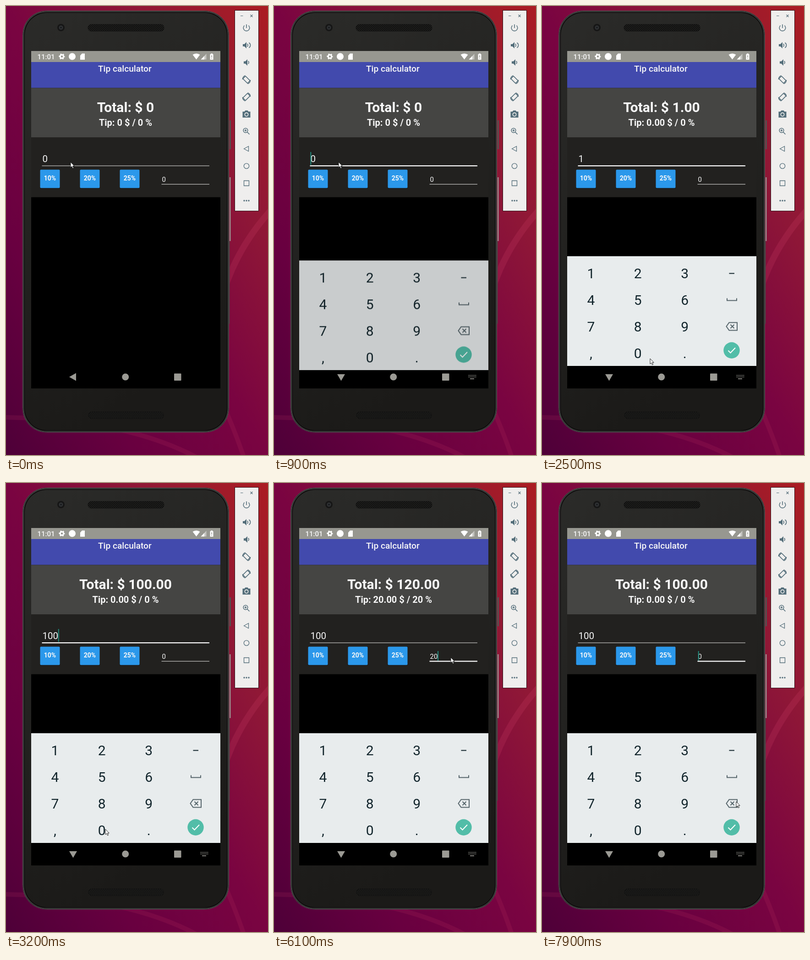
An HTML page for the animation above (8 s loop, 572x978 px).

```html
<!DOCTYPE html>
<html lang="en">
<head>
<meta charset="utf-8">
<title>Tip calculator</title>
<style>
  html, body { margin: 0; width: 100%; height: 100%; overflow: hidden; background: #75033f; }
  svg { display: block; width: 100vw; height: 100vh; }
  text { font-family: Roboto, sans-serif; fill: #f8f8f8; }
  .mid { text-anchor: middle; }
  .bold { font-weight: 700; }
  .key { font-size: 30px; fill: #12252c; text-anchor: middle; }
  .line { fill: none; stroke: #56656b; stroke-width: 2; }
  .tool { fill: none; stroke: #546e7a; stroke-width: 1.6; }
  .tool .solid { fill: #546e7a; stroke: none; }
</style>
</head>
<body>
<svg viewBox="0 0 572 978" preserveAspectRatio="none">
  <defs>
    <linearGradient id="wall" x1="0" y1="1" x2="1" y2="0">
      <stop offset="0" stop-color="#4e0038"/>
      <stop offset=".25" stop-color="#690040"/>
      <stop offset=".5" stop-color="#7a0441"/>
      <stop offset=".75" stop-color="#901836"/>
      <stop offset="1" stop-color="#ab1d22"/>
    </linearGradient>
    <linearGradient id="body" x1="0" y1="0" x2=".3" y2="1">
      <stop offset="0" stop-color="#2b2b29"/>
      <stop offset="1" stop-color="#1b1a18"/>
    </linearGradient>
    <pattern id="mesh" width="4" height="4" patternUnits="userSpaceOnUse">
      <rect width="4" height="4" fill="#252523"/>
      <circle cx="1" cy="1" r="1.1" fill="#050505"/>
      <circle cx="3" cy="3" r="1.1" fill="#050505"/>
    </pattern>
    <clipPath id="screen"><rect x="55" y="98" width="413" height="735"/></clipPath>
  </defs>

  <!-- Wallpaper -->
  <rect width="572" height="978" fill="url(#wall)"/>
  <g fill="none" stroke="#d0406a" stroke-opacity=".2">
    <path d="M470 640Q500 530 580 443" stroke-width="14"/>
    <path d="M0 896Q260 900 420 985M470 860Q498 920 520 985" stroke-width="10" stroke-opacity=".12"/>
  </g>

  <!-- Phone -->
  <path d="M488 249h3v63h-3z" fill="#55504f"/>
  <path d="M488 373h2.500v139h-2.500z" fill="#99908f"/>
  <path d="M487 512h1.500v180h-1.500z" fill="#4a3c40"/>
  <rect x="36.500" y="10.500" width="450" height="918" rx="52" fill="#0b0b0b" stroke="#5b5a59"/>
  <rect x="38.500" y="12.500" width="446" height="914" rx="50" fill="none" stroke="#3e3e3d" stroke-width="2"/>
  <rect x="41" y="15" width="441" height="909" rx="48" fill="url(#body)"/>
  <circle cx="120" cy="47" r="8" fill="#161616"/>
  <circle cx="120" cy="47" r="4.500" fill="#303234"/>
  <circle cx="120" cy="47" r="2" fill="#181a1d"/>
  <g fill="url(#mesh)" stroke="#111" stroke-width=".7">
    <rect x="179" y="40" width="166" height="15" rx="7"/>
    <rect x="180" y="884" width="164" height="15" rx="7"/>
  </g>

  <!-- App -->
  <g clip-path="url(#screen)">
    <rect x="55" y="98" width="413" height="735"/>
    <rect x="55" y="98" width="413" height="24" fill="#979790"/>
    <text x="68.500" y="115.500" font-size="15" font-weight="500">11:01</text>
    <g fill="#fff">
      <circle cx="122" cy="110" r="3.700" fill="none" stroke="#fff" stroke-width="3"/>
      <circle cx="122" cy="110" r="5.600" fill="none" stroke="#fff" stroke-width="2" stroke-dasharray="2.900 2.960" stroke-dashoffset="1.450"/>
      <circle cx="144.500" cy="110" r="7.500"/>
      <path d="M166 103.500h6v13.500h-10v-9z"/>
      <path d="M407.500 106q8-5 16 0l-8 10.500z"/>
      <path d="M437.500 104v12.500h-12z" fill-opacity=".45"/>
      <path d="M433 109v7.500h-7.500z"/>
      <path d="M447 103.500h4v1.500h1.500v12h-7v-12h1.500z"/>
      <path d="M448.200 107.500h1.600v4h-1.600zM448.200 113h1.600v1.600h-1.600z" fill="#979790"/>
    </g>
    <rect x="55" y="122" width="413" height="56.500" fill="#424aad"/>
    <text x="259.300" y="143" class="mid" font-size="19.100" font-weight="500">Tip calculator</text>
    <rect x="55" y="178.500" width="413" height="108" fill="#454543"/>
    <text id="total" x="261" y="230.500" class="mid bold" font-size="30"></text>
    <text id="tip" x="261" y="260.500" class="mid bold" font-size="20"></text>
    <rect x="55" y="286.500" width="413" height="130" fill="#22211f"/>
    <g id="buttons"></g>
    <text id="bill" x="79.500" y="339.500" font-size="20.500"></text>
    <text id="percent" x="340.500" y="382.500" font-size="15"></text>
    <rect id="billLine" x="78.500" width="365.500"/>
    <rect id="percentLine" x="339.500" width="104.500"/>
    <rect id="caret" width="2" fill="#1f8a7d"/>

    <g id="keyboard">
      <rect x="55" y="545" width="413" height="239" fill="#e8eced"/>
      <rect id="pressed" width="102" height="56" rx="3" fill="#cfd5d7"/>
      <g id="keys"></g>
      <path d="M408.500 582.500h11.500" class="line" style="stroke:#12252c"/>
      <path d="M404 636.500v5h21v-5" class="line"/>
      <path d="M408.500 689.500h17.500v17h-17.500l-6-8.500zM411.500 694l8 8m0-8l-8 8" class="line"/>
      <circle cx="414" cy="750" r="17.700" fill="#52bda8"/>
      <path d="M406.500 750.500l5 5l10.500-11" class="line" style="stroke:#fff"/>
    </g>

    <g fill="#9b9a94">
      <path id="back"/>
      <circle cx="260.700" cy="808" r="7.500"/>
      <rect x="367" y="800.500" width="15.500" height="15.500" rx="1"/>
      <g id="switcher" fill="none" stroke="#9b9a94" stroke-width="1.700">
        <path d="M424.500 804.500h17M424.500 808h17" stroke-dasharray="1.800 1.200"/>
        <path d="M428 812h9"/>
      </g>
    </g>
  </g>

  <!-- Emulator toolbar -->
  <rect x="499.500" y="9.500" width="52" height="437" fill="#efeeed" stroke="#2c1116"/>
  <g class="tool">
    <path d="M512 21.500h5.500M533.500 19l5 5m0-5l-5 5" stroke-width="1.100"/>
    <path d="M520.500 42.500a6.800 6.800 0 1 0 9 0M525 40v8"/>
    <g id="speakers"></g>
    <path d="M530.500 80a6.500 6.500 0 0 1 0 11" />
    <g id="rotate">
      <rect x="-4" y="-7" width="8" height="14" rx="1" transform="translate(525 160.500) rotate(-45)"/>
      <path d="M516.500 160a9 9 0 0 1 6-8.500M533.500 161a9 9 0 0 1-6 8.500"/>
    </g>
    <use href="#rotate" transform="translate(1050 37.500) scale(-1 1)"/>
    <path class="solid" d="M516.500 230h4l2-2.500h5l2 2.500h4v13h-17z"/>
    <circle cx="525" cy="236.300" r="3.700" stroke="#efeeed"/>
    <circle cx="523" cy="271" r="4.800"/>
    <path d="M526.500 274.500l5 5M520.500 271h5M523 268.500v5"/>
    <path d="M519.500 311l10-5.500v11zM519.500 380.500h11v11h-11z" stroke-width="1.300"/>
    <circle cx="525" cy="348.500" r="5.700" stroke-width="1.300"/>
    <g class="solid"><circle cx="520" cy="424" r="1.700"/><circle cx="525" cy="424" r="1.700"/><circle cx="530" cy="424" r="1.700"/></g>
  </g>

  <path id="cursor" d="M0 0v11.800l2.700-2.500 1.900 4.400 2-.9-1.900-4.200h3.500z" fill="#fff" stroke="#111" stroke-width=".9"/>
</svg>

<script>
const LOOP = 8000, TICK = 100;
const el = Object.fromEntries([...document.querySelectorAll('[id]')].map(node => [node.id, node]));

// Each entry is [time, value]; values hold until the next entry.
const bills = [[0, ''], [2000, '1'], [2900, '10'], [3100, '100']];
const percents = [[0, ''], [4400, '25'], [5200, '20'], [7400, '2'], [7800, '']];
const focuses = [[0, ''], [800, 'bill'], [6100, 'percent']];
const carets = [[0, 0], [800, 1], [1300, 0], [1800, 1], [2500, 0], [2900, 1], [3600, 0], [4100, 1],
  [4600, 0], [5200, 1], [5800, 0], [6100, 1], [6600, 0], [7100, 1]];
// Column and row of the key held down.
const presses = [[0, null], [1900, [0, 0]], [2100, null], [2900, [1, 3]], [3000, null],
  [3100, [1, 3]], [3200, null], [7300, [3, 2]], [7500, null]];
const ripples = [[4400, 2], [5200, 1]];

const pointer = [[1000, 141, 340], [1500, 113, 585], [2100, 113, 585], [2500, 236, 768], [2600, 236, 768],
  [2700, 217, 754], [3300, 217, 754], [3750, 323, 590], [4200, 268, 380], [4500, 268, 380],
  [4750, 225, 397], [5000, 181, 380], [5200, 181, 380], [5600, 369, 390], [5800, 386, 380],
  [6500, 386, 380], [6700, 383, 528], [7100, 427, 696], [7600, 427, 696], [7800, 424, 694]];
const keyboardSlide = [[800, 40, .45], [900, 9.300, .87], [1000, 0, 1]];

const current = (list, t) => list.filter(([start]) => start <= t).pop()[1];

function tween(frames, t) {
  const next = frames.findIndex(([time]) => time > t);
  if (next < 0) return frames[frames.length - 1].slice(1);
  if (next === 0) return frames[0].slice(1);
  const [from, to] = [frames[next - 1], frames[next]];
  const p = (t - from[0]) / (to[0] - from[0]);
  const eased = p * p * (3 - 2 * p);
  return from.slice(1).map((v, i) => v + (to[i + 1] - v) * eased);
}

function set(node, attributes) {
  for (const [name, value] of Object.entries(attributes)) node.setAttribute(name, value);
}

el.buttons.innerHTML = [10, 20, 25].map((n, i) => {
  const x = 74.5 + 87 * i;
  return `<rect x="${x}" y="358" width="43" height="40" rx="2" fill="#111" opacity=".6"/>
    <rect x="${x}" y="356.500" width="43" height="40" rx="2" fill="#2b98eb"/>
    <circle class="ripple" cx="${x + 20.5}" cy="377" fill="#164f86"/>
    <text x="${x + 21.5}" y="380" class="mid bold" font-size="14">${n}%</text>`;
}).join('');
const rippleCircles = document.querySelectorAll('.ripple');

el.keys.innerHTML = ['123', '456', '789', ',0.'].map((row, r) => [...row].map((label, c) =>
  `<text class="key" x="${107 + 102.3 * c}" y="${592.5 + 58 * r}">${label}</text>`).join('')).join('');

el.speakers.innerHTML = [[522, 85.5], [524, 123]].map(([x, y]) =>
  `<path class="solid" d="M${x - 5} ${y - 2.5}h3.500l4.500-4.500v14l-4.500-4.500h-3.500z"/>
   <path d="M${x + 4.5} ${y - 3}a3.500 3.500 0 0 1 0 6"/>`).join('');

function drawSummary(bill, percent) {
  const money = n => bill ? n.toFixed(2) : '0';
  const tip = bill * percent / 100;
  el.total.textContent = `Total: $ ${money(+bill + tip)}`;
  el.tip.textContent = `Tip: ${money(tip)} $ / ${percent || 0} %`;
  el.bill.textContent = bill || '0';
  el.percent.textContent = percent || '0';
}

function drawFocus(focus, bill, percent, caretOn) {
  const underline = (node, y, active) => set(node, active
    ? { y: y - .5, height: 2.2, fill: '#fff' }
    : { y, height: 1.2, fill: '#c9c9c7' });
  underline(el.billLine, 347.5, focus === 'bill');
  underline(el.percentLine, 387.7, focus === 'percent');
  set(el.caret, focus === 'percent'
    ? { x: 340.7 + 8.2 * percent.length, y: 366, height: 21 }
    : { x: 79.3 + 11.5 * bill.length, y: 318, height: 28 });
  set(el.caret, { opacity: focus ? caretOn : 0 });
}

function drawKeyboard(t) {
  const open = t >= 800;
  const [offset, opacity] = tween(keyboardSlide, t);
  set(el.keyboard, { opacity: open ? opacity : 0, transform: `translate(0 ${offset})` });
  set(el.switcher, { opacity: open ? 1 : 0 });
  set(el.back, { d: open ? 'M138 802h17l-8.500 14.500z' : 'M138 808l15-8.500v17z' });
  const press = current(presses, t);
  set(el.pressed, { opacity: press ? 1 : 0 });
  if (press) set(el.pressed, { x: 56 + 102.3 * press[0], y: 553 + 58 * press[1] });
}

function drawRipples(t) {
  rippleCircles.forEach(circle => set(circle, { opacity: 0 }));
  for (const [start, button] of ripples) {
    const age = (t - start) / 400;
    if (age >= 0 && age < 1) set(rippleCircles[button], { r: 11 + 7 * age, opacity: .4 * (1 - age) });
  }
}

function draw(now) {
  const t = Math.floor(now % LOOP / TICK) * TICK;
  const bill = current(bills, t), percent = current(percents, t);
  drawSummary(bill, percent);
  drawFocus(current(focuses, t), bill, percent, current(carets, t));
  drawKeyboard(t);
  drawRipples(t);
  set(el.cursor, { transform: `translate(${tween(pointer, t).join(' ')})` });
}

let began;
function frame(now) {
  began ??= now;
  draw(now - began);
  requestAnimationFrame(frame);
}
draw(0);
requestAnimationFrame(frame);
</script>
</body>
</html>
```
